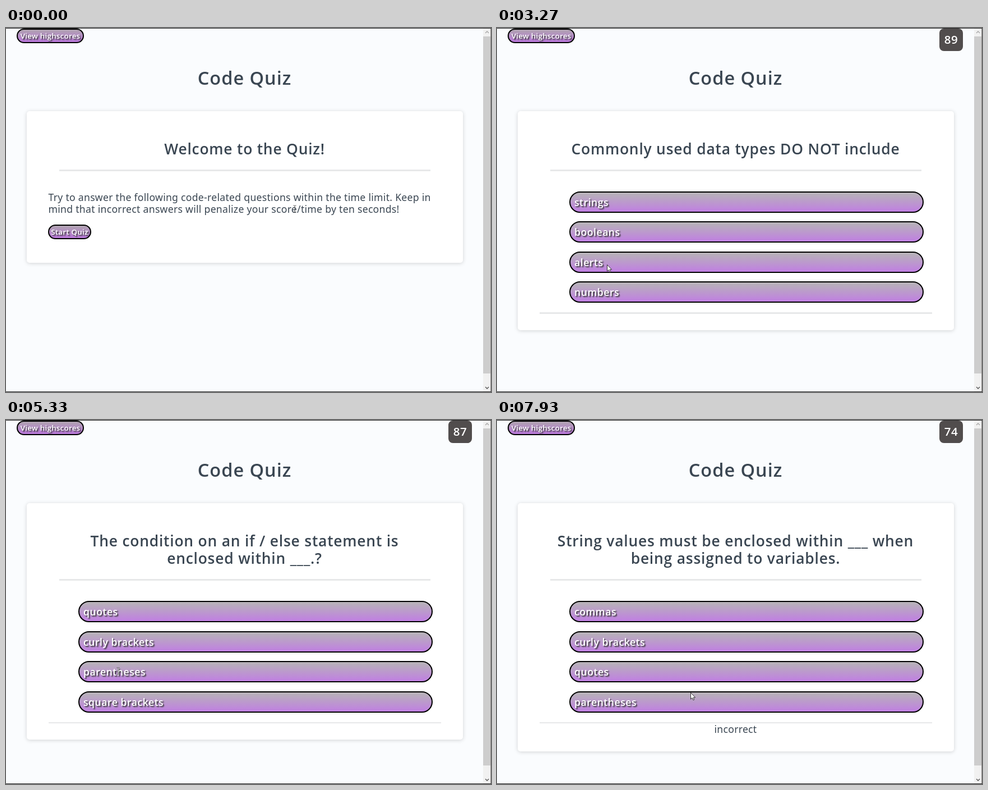
Write an HTML page that moves like this. It is 865 by 648 pixels and loops after 8 s.

```html
<!DOCTYPE html>
<html lang="en">
<head>
<meta charset="utf-8">
<title>Code Quiz</title>
<style>
  html, body { margin: 0; width: 100%; height: 100%; overflow: hidden; }
  body {
    position: relative; background: #fafcfe; color: #3a4652;
    font: 17.6px/21px "Noto Sans", "Open Sans", sans-serif; letter-spacing: .29px;
  }
  body * { position: absolute; box-sizing: border-box; margin: 0; white-space: nowrap; }
  br { position: static; }
  h1, h2, .pill, #timer {
    font-family: "Open Sans", "Noto Sans", sans-serif; font-weight: 600; letter-spacing: .03em;
  }
  h1 { left: 0; width: 851px; top: 69px; font-size: 32.5px; line-height: 40px; text-align: center; }
  h2 { left: 0; width: 777px; top: 51.5px; font-size: 26.4px; line-height: 31.3px; text-align: center; }
  #card {
    left: 37px; top: 148px; width: 778px; background: #fff; border-radius: 5px;
    box-shadow: 0 1px 7px rgba(0, 0, 0, .17);
  }
  .rule { height: 2.5px; background: #e7e8e9; }
  #rule { left: 58px; width: 662px; }
  #endRule { left: 38.5px; width: 700.5px; }
  #intro { left: 38.5px; top: 142.5px; }
  #status { left: 0; width: 777px; text-align: center; }
  .pill {
    border: 2px solid #000; color: #fff;
    background: linear-gradient(#b7b4b7, #c07fe2); text-shadow: 2px 2px 2px #333;
  }
  .button {
    height: 26px; border-radius: 13px; font-size: 13.33px; line-height: 22px;
    letter-spacing: .02em; text-align: center;
    background: linear-gradient(#b0a4b0, #b976da);
  }
  .answer {
    left: 92px; width: 631.5px; height: 38px; border-radius: 19px;
    padding-left: 7px; line-height: 34px;
  }
  #timer {
    left: 789px; top: 1px; width: 42px; height: 40px; border-radius: 8px;
    background: #514d4d; color: #fff; font-size: 20.5px; line-height: 39px; text-align: center;
  }
  #scrollbar { left: 851px; top: 0; width: 13px; height: 648px; background: #f1f1f1; }
  #thumb { left: 0; top: 15px; width: 13px; height: 600px; background: #cdcdcd; }
  #edge { left: 864px; top: 0; width: 1px; height: 648px; background: #8a8684; }
  .line { left: 0; width: 865px; height: 1px; background: #262626; }
  svg { left: 0; top: 0; overflow: visible; }
</style>
</head>
<body>
<div class="pill button" style="left:19px;top:1px;width:120px">View highscores</div>
<div id="timer"></div>
<h1>Code Quiz</h1>
<div id="card">
  <h2 id="title"></h2>
  <div class="rule" id="rule"></div>
  <div id="welcome">
    <p id="intro">Try to answer the following code-related questions within the time limit. Keep in<br>mind that incorrect answers will penalize your score/time by ten seconds!</p>
    <div class="pill button" style="left:38px;top:202px;width:77px">Start Quiz</div>
  </div>
  <div id="answers"></div>
  <div class="rule" id="endRule"></div>
  <div id="status"></div>
</div>
<div id="scrollbar">
  <div id="thumb"></div>
  <svg width="13" height="648" fill="none" stroke-width="1.3">
    <path d="M4 9l3-3 3 3" stroke="#a5a5a5"/>
    <path d="M4 639l3 3 3-3" stroke="#505050"/>
  </svg>
</div>
<div id="edge"></div>
<div class="line" style="top:0"></div>
<div class="line" style="top:647px"></div>
<svg id="cursor" width="10" height="15">
  <path id="arrow" d="M.5.5V12l2.6-2.4 1.9 4.1 1.8-.8L5 9h3.6Z" fill="#fff" stroke="#222" stroke-width=".9"/>
  <path id="beam" d="M-2.5-6h2L0-5.5.5-6h2M0-5.5v11M-2.5 6h2L0 5.5.5 6h2" fill="none" stroke="#555"/>
</svg>
<script>
const LOOP = 8000, FRAME = 200 / 3, LINE = 31.3;
const $ = id => document.getElementById(id);

const scenes = [
  { at: 0, title: 'Welcome to the Quiz!' },
  { at: 1930, title: 'Commonly used data types DO NOT include',
    answers: ['strings', 'booleans', 'alerts', 'numbers'] },
  { at: 3600, title: 'The condition on an if / else statement is<br>enclosed within ___.?',
    answers: ['quotes', 'curly brackets', 'parentheses', 'square brackets'],
    status: 'correct', statusEnd: 4600 },
  { at: 5670, title: 'Arrays in JavaScript can be used to store ___.?',
    answers: ['numbers and strings', 'other arrays', 'booleans', 'all of the above'],
    status: 'correct', statusEnd: 6665 },
  { at: 7400, title: 'String values must be enclosed within ___ when<br>being assigned to variables.',
    answers: ['commas', 'curly brackets', 'quotes', 'parentheses'],
    status: 'incorrect', statusEnd: LOOP }
];

const timer = [[1930, 90], [2865, 89], [3865, 88], [4865, 87], [5865, 86], [6865, 85], [7865, 74]];

// time, x, y, text cursor
const path = [
  [0, 515, 322, 1], [10, 515, 322], [270, 420, 405], [470, 330, 442], [670, 220, 430],
  [867, 166, 398], [1467, 124, 364], [2267, 124, 364], [2600, 152, 402],
  [2933, 195, 441], [3000, 195, 441], [3267, 195.5, 421], [4000, 195.5, 421],
  [4400, 200, 344], [4667, 198, 370], [4800, 196, 385], [5333, 200, 447, 1],
  [5670, 200, 447], [5800, 200, 447], [6667, 203, 329], [6933, 213, 311, 1],
  [7400, 213, 311], [7667, 213, 311], [7933, 344.5, 485], [LOOP, 344.5, 485]
];

const latest = (list, time, key) => list.filter(item => item[key] <= time).pop();
const titleShift = scene => scene.title.includes('<br>') ? LINE : 0;
let shownScene;

function showScene(scene) {
  if (scene === shownScene) return;
  shownScene = scene;
  const shift = titleShift(scene);
  $('title').innerHTML = scene.title;
  $('rule').style.top = 104 + shift + 'px';
  $('welcome').hidden = !!scene.answers;
  $('endRule').hidden = !scene.answers;
  $('endRule').style.top = 358.3 + shift + 'px';
  $('status').style.top = 360.8 + shift + 'px';
  $('answers').innerHTML = (scene.answers || []).map((text, i) =>
    `<div class="pill answer" style="top:${143 + shift + i * 53.4}px">${text}</div>`).join('');
}

function showStatus(scene, time) {
  const visible = scene.status && time < scene.statusEnd;
  const height = scene.answers ? 390 + titleShift(scene) + (visible ? 21 : 0) : 269.5;
  $('status').textContent = visible ? scene.status : '';
  $('card').style.height = height + 'px';
}

function showCursor(time) {
  const t = Math.floor((time + 4) / FRAME) * FRAME + 1;
  const from = latest(path, t, 0);
  const to = path[path.indexOf(from) + 1] || from;
  const k = to === from ? 0 : (t - from[0]) / (to[0] - from[0]);
  const mix = i => Math.round(from[i] + (to[i] - from[i]) * k);
  $('cursor').style.transform = `translate(${mix(1)}px, ${mix(2)}px)`;
  $('beam').style.display = from[3] ? '' : 'none';
  $('arrow').style.display = from[3] ? 'none' : '';
}

function draw(time) {
  const scene = latest(scenes, time, 'at');
  const tick = latest(timer, time, 0);
  showScene(scene);
  showStatus(scene, time);
  $('timer').hidden = !tick;
  $('timer').textContent = tick ? tick[1] : '';
  showCursor(time);
}

const start = performance.now();
function loop() {
  draw((performance.now() - start) % LOOP);
  requestAnimationFrame(loop);
}
loop();
</script>
</body>
</html>
```
